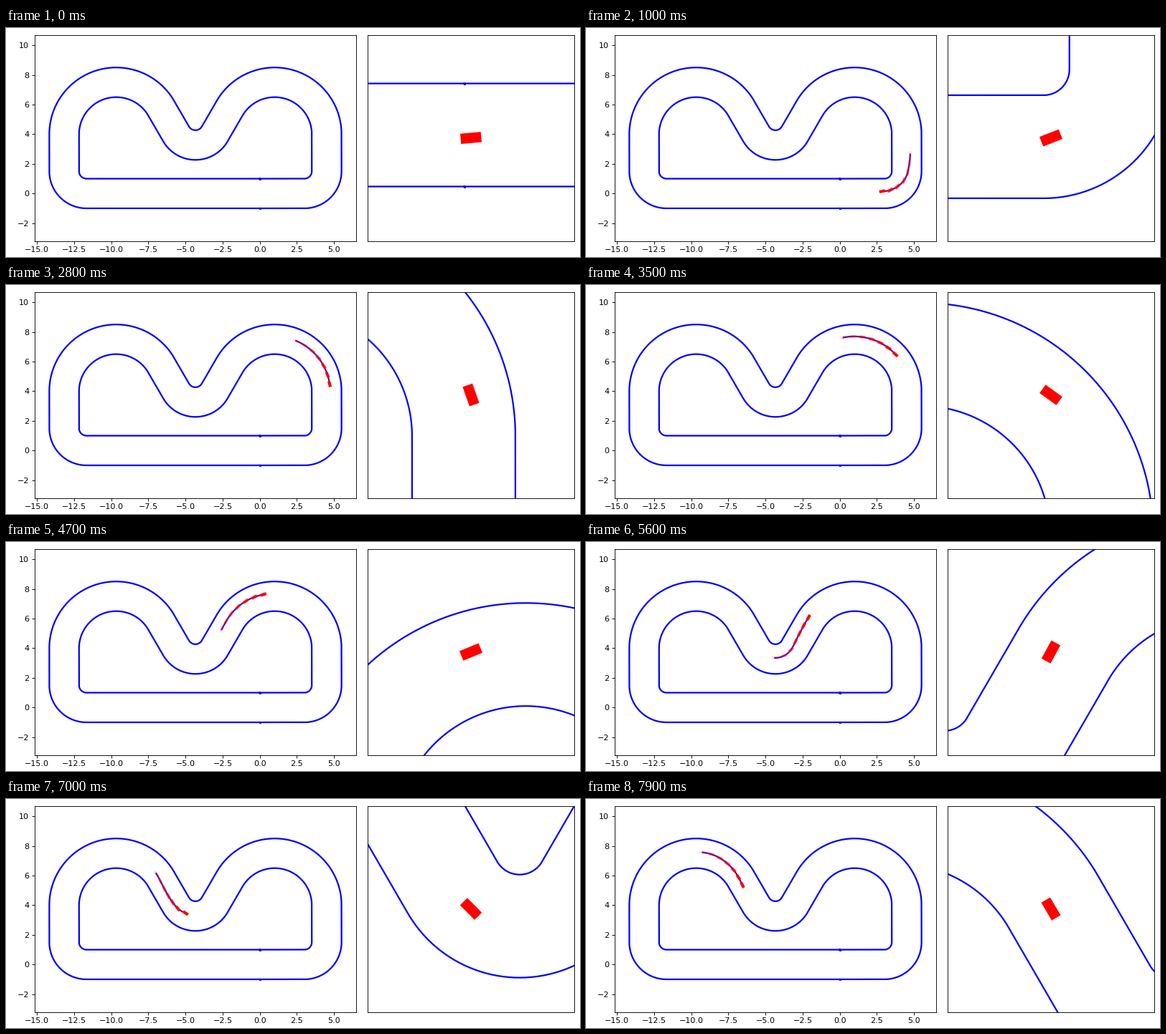
Recreate the animation shown at these times as a matplotlib script. Size 800 by 320 pixels, loop 8 s.

```python
import numpy as np
import matplotlib.pyplot as plt
from matplotlib.animation import FuncAnimation
from matplotlib.patches import Polygon

FRAMES, INTERVAL = 80, 100
CAR = np.array([-.2 - .1j, .2 - .1j, .2 + .1j, -.2 + .1j])
PLAN = 2 * np.arange(7) - 1     # planned steps relative to the current one
LEAD = 1.3                      # the nose points this many steps ahead

# Centre line: (length, 0) is a straight, (radius, degrees) a bend.
SECTIONS = [(3, 0), (1.5, 90), (2.5, 0), (3.5, 150), (2, 0), (1.5, -120),
            (2, 0), (3.5, 150), (2.5, 0), (1.5, 90), (11.66, 0)]

# Racing line: distance along the track, offset to the left of its centre
RACING = [(-2, -.165), (3.6, .17), (6.6, -.24), (12.5, -.19), (17.1, -.234),
          (20.7, -.08), (23, .15), (27.2, -.09)]


def section_length(size, turn):
    return size * np.radians(abs(turn)) if turn else size


def track_point(s, offset):
    """Point at distance s, shifted left of the centre line, as x + iy."""
    pos, head = 0j, 0.0
    for size, turn in SECTIONS:
        length = section_length(size, turn)
        step = min(s, length)
        fwd = np.exp(1j * head)
        if turn:
            radius = size * np.sign(turn)
            swing = step / radius
            pos += 1j * radius * fwd * (1 - np.exp(1j * swing))
            head += swing
        else:
            pos += step * fwd
        s -= step
        if s <= 0:
            break
    return pos + 1j * offset * np.exp(1j * head)


def racing_offset(s):
    for (s0, a), (s1, b) in zip(RACING, RACING[1:]):
        if s <= s1:
            u = (s - s0) / (s1 - s0)
            return a + (b - a) * u * u * (3 - 2 * u)
    return RACING[-1][1]


def position(step):
    """Steady pace, with a surge through the hairpin."""
    s = .13 + .303 * step + .27 * np.exp(-((step - 70) / 5) ** 2)
    return track_point(s, racing_offset(s))


def car_shape(step):
    nose = step + LEAD
    way = position(nose + .05) - position(nose - .05)
    return xy(position(step) + CAR * way / abs(way))


def xy(z):
    z = np.asarray(z)
    return np.column_stack([z.real, z.imag])


fig = plt.figure(figsize=(10, 4), dpi=80, facecolor="white")
overview = fig.add_axes([.05, .07, .56, .9])
closeup = fig.add_axes([.63, .07, .36, .9])

lap = sum(section_length(*section) for section in SECTIONS)
for offset in (1, -1):
    edge = xy([track_point(s, offset) for s in np.linspace(0, lap, 1500)])
    for ax in (overview, closeup):
        ax.plot(*edge.T, color="b", lw=2)
        ax.plot([0], [offset], "s", color="b", ms=2.7, mew=0)

# Five percent margin around the track, equal scale on both axes
left, right = -15.143, 6.483
half = (right - left) * 288 / 448 / 2
overview.set_xlim(left, right)
overview.set_ylim(3.75 - half, 3.75 + half)
overview.set_xticks(np.arange(-15, 6, 2.5))
overview.set_yticks(np.arange(-2, 11, 2))
closeup.set_xticks([])
closeup.set_yticks([])

plan_line, = overview.plot([], [], color=(.4, 0, .6), lw=2, zorder=3)
ghosts = [overview.add_patch(Polygon(xy(CAR), fc="red", ec="none", zorder=4,
                                     alpha=1 - j / len(PLAN)))
          for j in range(len(PLAN))]
car = closeup.add_patch(Polygon(xy(CAR), fc="red", ec="none", zorder=4))


def update(frame):
    here = position(frame)
    closeup.set_xlim(here.real - 2, here.real + 2)
    closeup.set_ylim(here.imag - 2, here.imag + 2)
    car.set_xy(car_shape(frame))

    planned = frame > 0
    plan_line.set_visible(planned)
    if planned:
        steps = frame + np.linspace(PLAN[0], PLAN[-1], 25)
        plan_line.set_data(*xy([position(t) for t in steps]).T)
    for ghost, ahead in zip(ghosts, PLAN):
        ghost.set_visible(planned)
        if planned:
            ghost.set_xy(car_shape(frame + ahead))
    return [plan_line, car, *ghosts]


anim = FuncAnimation(fig, update, frames=FRAMES, interval=INTERVAL,
                     repeat=True, repeat_delay=0, blit=False)
plt.show()
```
